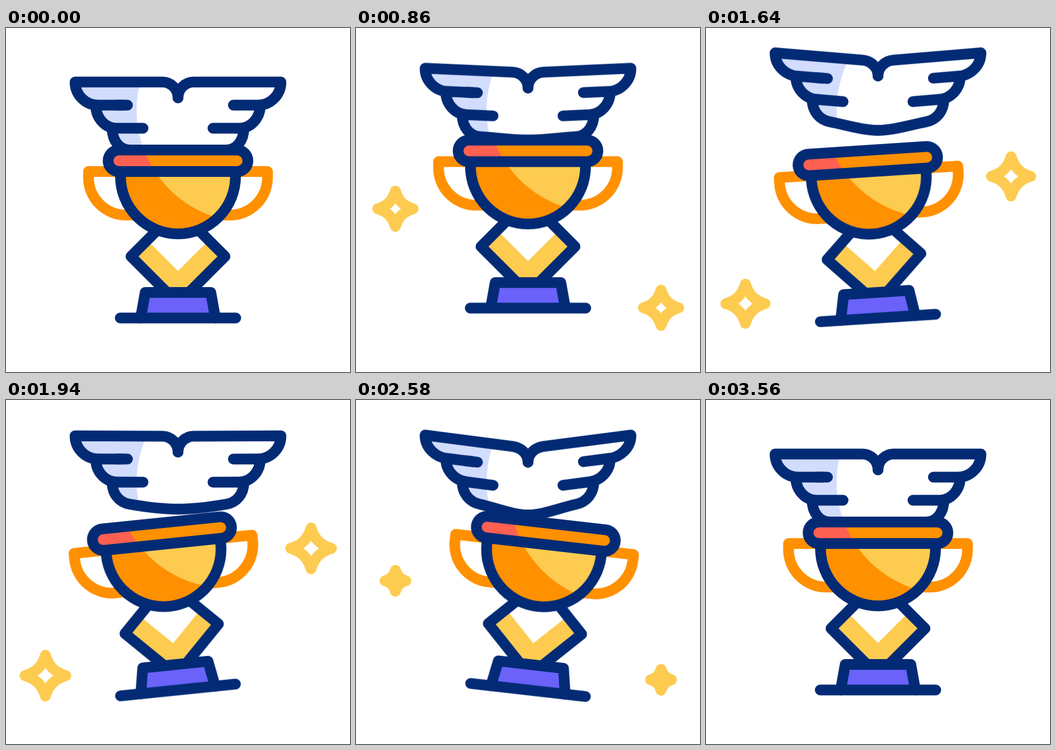
An HTML page without scripts for the animation above (3.6 s loop, 640 px wide and 640 px high).

```html
<!DOCTYPE html>
<html lang="en">
<head>
<meta charset="utf-8">
<title>Winged trophy</title>
<style>
  :root {
    --navy: #032b75;
    --orange: #ff9000;
    --yellow: #fdcb50;
    --smooth: cubic-bezier(.333, 0, .667, 1);
  }
  html, body { margin: 0; width: 100%; height: 100%; overflow: hidden; background: #fff; }
  svg { display: block; width: 640px; height: 640px; }

  .line { fill: none; stroke: var(--navy); stroke-width: 20; stroke-linecap: round; stroke-linejoin: round; }
  .handle { stroke: var(--orange); }
  .orange { fill: var(--orange); }
  .yellow { fill: var(--yellow); }
  .pale { fill: #d2dcfd; }

  .fly, .jump, .rock, .wing, .feather { animation: 3600ms var(--smooth) infinite; }
  .fly { animation-name: fly; }
  .jump { animation-name: jump; }
  .rock { animation-name: rock; transform-origin: 320px 540px; }
  .wing { animation-name: flap; }
  .feather { animation-name: lift; transform-origin: 226px 143.5px; }

  .star {
    fill: none; stroke: var(--yellow); stroke-width: 20; stroke-linejoin: round;
    vector-effect: non-scaling-stroke;
  }
  .twice { animation: twice 3600ms infinite; }
  .once { animation: once 3600ms infinite; }

  /* Wings drift down after the trophy drops away */
  @keyframes fly {
    0%, 95.556%, 100% { transform: translateY(0); }
    16.667% { transform: translateY(26px); }
    29.444% { transform: translateY(-48px); }
  }
  @keyframes jump {
    0%, 38.889%, 100% { transform: translateY(0); }
    16.667% { transform: translateY(26px); }
    29.444% { transform: translateY(-48px); }
  }
  @keyframes rock {
    0%, 38.889%, 98.889%, 100% { transform: rotate(0deg); }
    51.111% { transform: rotate(-6.5deg); }
    71.944% { transform: rotate(6.5deg); }
    90% { transform: rotate(-4deg); }
  }
  /* Left wing: flat, raised, and flat with a sagging belly */
  @keyframes flap {
    0%, 16.667%, 95.556%, 100% {
      d: path("M320 130C320 113.5 307 100.5 291 100.5L128.5 100.5C128.5 124 147.5 143.5 171 143.5L217 143.5L167 143.5C167 167 184 186.5 206 186.5L255 186.5L197.5 186.5C197.5 209 211 227 231 227C260 227 292 227 320 227");
    }
    36.667%, 76.111% {
      d: path("M320 130C320 113.5 306 102.5 291 100.5L128.5 76.5C128.5 100 147.5 117.5 171 120.5L217 126.8L167 119.5C167 143 184 160.5 206 163.5L255 171L197.5 162.5C197.5 185 211 201 231 205.5C260 212 292 227 320 227");
    }
    56.111% {
      d: path("M320 130C320 113.5 307 100.5 291 100.5L128.5 100.5C128.5 124 147.5 143.5 171 143.5L217 143.5L167 143.5C167 167 184 186.5 206 186.5L255 186.5L197.5 186.5C197.5 209 211 225 231 228C260 233 292 236.5 320 236.5");
    }
  }
  @keyframes lift {
    0%, 16.667%, 56.111%, 95.556%, 100% { transform: none; }
    36.667%, 76.111% { transform: translateY(-15.5px) rotate(7.7deg); }
  }
  @keyframes twice {
    0%, 33.889%, 98.889%, 100% { transform: scale(0); }
    1.389%, 66.389% { transform: scale(0); animation-timing-function: cubic-bezier(.333, .5, .667, .95); }
    17.639%, 82.639% { transform: scale(1); animation-timing-function: cubic-bezier(.333, .05, .667, .5); }
  }
  @keyframes once {
    0%, 66.389%, 100% { transform: scale(0); }
    33.889% { transform: scale(0); animation-timing-function: cubic-bezier(.333, .5, .667, .95); }
    50.139% { transform: scale(1); animation-timing-function: cubic-bezier(.333, .05, .667, .5); }
  }
</style>
</head>
<body>
<svg viewBox="0 0 640 640">
  <defs>
    <path id="star" class="star" d="M0-42C7-19 19-7 42 0C19 7 7 19 0 42C-7 19-19 7-42 0C-19-7-7-19 0-42Z"/>
    <path id="handle" class="line handle" d="M210 267H153.5V278A70 70 0 0 0 223.5 348H245"/>
    <path id="cup" d="M213 276A107 107 0 0 0 427 276"/>
    <rect id="rim" x="190" y="227" width="260" height="40" rx="20"/>
    <circle id="light" cx="451" cy="153" r="208"/>
    <clipPath id="inCup"><use href="#cup"/></clipPath>
    <clipPath id="inRim"><use href="#rim"/></clipPath>
  </defs>

  <!-- The lit side stays still while the wings move through it -->
  <g class="fly"><path class="wing pale"/></g>
  <use href="#light" fill="#fff"/>
  <g class="fly">
    <path class="wing line"/>
    <path class="feather line" d="M205 143.5H226"/>
    <g transform="matrix(-1 0 0 1 640 0)"><path class="wing line"/></g>
  </g>

  <g class="jump"><g class="rock">
    <use href="#handle"/>
    <use href="#handle" transform="matrix(-1 0 0 1 640 0)"/>

    <path class="yellow" d="M232.5 425L262.7 394.8L320 452L377.3 394.8L407.5 425L345 487.5H295Z"/>
    <path class="line" d="M280 377.5L232.5 425L297.5 490M360 377.5L407.5 425L342.5 490"/>

    <path class="line" style="fill:#6a62f9" d="M250.5 539.5L259 492H381L389.5 539.5"/>
    <path class="line" d="M212.5 539.5H427.5"/>

    <use href="#cup" class="orange"/>
    <g clip-path="url(#inCup)"><use href="#light" class="yellow"/></g>
    <use href="#cup" class="line"/>

    <use href="#rim" fill="#ff6052"/>
    <g clip-path="url(#inRim)"><use href="#light" class="orange"/></g>
    <use href="#rim" class="line"/>
  </g></g>

  <g transform="translate(73.3 336.3)"><use href="#star" class="twice"/></g>
  <g transform="translate(567.5 520.5)"><use href="#star" class="twice"/></g>
  <g transform="translate(73.3 512.8)"><use href="#star" class="once"/></g>
  <g transform="translate(567.5 276)"><use href="#star" class="once"/></g>
</svg>
</body>
</html>
```
